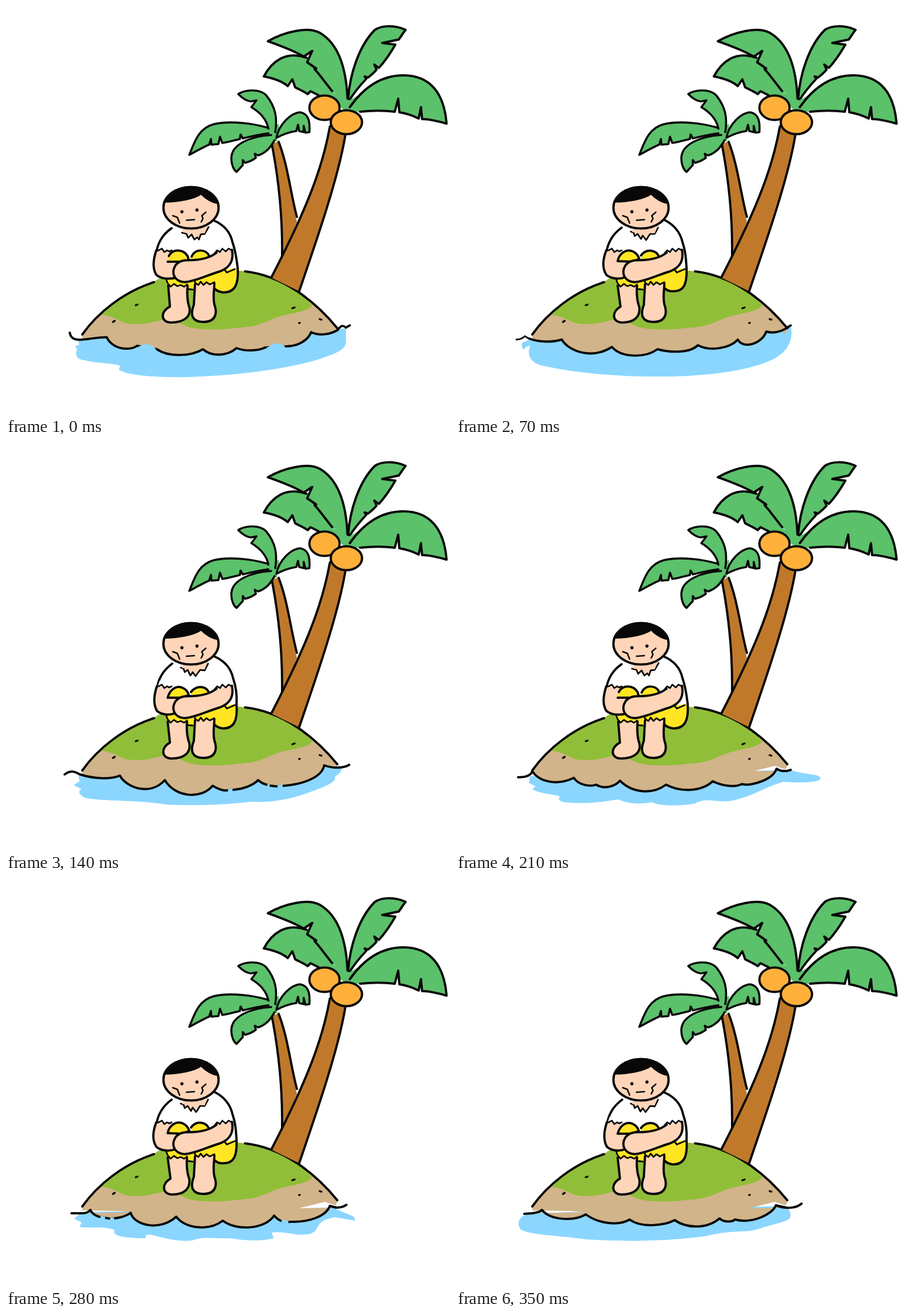
Animation, 780 px wide and 718 px high, one loop 0.42 s. Source, as an HTML page:

```html
<!DOCTYPE html>
<html lang="en">
<head>
<meta charset="utf-8">
<title>Castaway</title>
<style>
html, body { margin: 0; width: 100%; height: 100%; overflow: hidden; background: #fff; }
svg { display: block; width: 780px; height: 718px; }
path, ellipse { stroke-linecap: round; stroke-linejoin: round; }
.ink { fill: none; stroke: #080808; stroke-width: 4; }
.leaf { fill: #5bc16b; }
.bark { fill: #c0792b; }
.nut { fill: #ffb03b; }
.sand { fill: #d1b489; }
.grass { fill: #91be38; }
.skin { fill: #ffd5b9; }
.cloth { fill: #fff; }
.shorts { fill: #ffe522; }
.sea { fill: #8bd6ff; stroke: none; }
.foam { stroke: #8bd6ff; stroke-width: 5; stroke-linecap: butt; }
.bare { stroke: none; }
.thin { stroke-width: 2.8; }

/* six sea drawings, three drawings of the man */
.wave, .pose { visibility: hidden; animation: wave 420ms step-end infinite; animation-delay: calc(var(--i) * 70ms - 420ms); }
.pose { animation-name: pose; animation-duration: 210ms; }
@keyframes wave { 0% { visibility: visible } 16.66%, 100% { visibility: hidden } }
@keyframes pose { 0% { visibility: visible } 33.33%, 100% { visibility: hidden } }
</style>
</head>
<body>
<svg viewBox="0 0 780 718">
<defs>
  <path id="beach" class="sand bare" d="M134 579C160 541 200 505 260 486C300 464 375 462 420 467C490 476 550 525 583 568L579 576L560 570L495 586L300 594L200 586L134 585Z"/>
</defs>

<g class="ink">
  <g class="wave" style="--i:0">
    <path class="sea" d="M125 586L129 596L121 599Q127 604 123 609C123 619 128 622 136 623C160 629 185 628 201 633L198 640C215 651 270 654 320 653C420 650 510 636 560 618C590 608 599 600 597 588L597 568Z"/>
    <use href="#beach"/>
    <path class="sand" d="M135 587C150 586 165 582 177 583C183 596 198 604 214 603C221 603 226 601 230 598L265 604C285 618 325 617 346 604C360 617 388 617 405 602C420 608 443 607 455 601L492 599C513 599 531 588 536 574C550 581 570 578 583 570"/>
    <path class="sea" d="M231 602Q240 593 252 596Q262 600 265 608ZM457 604Q468 591 480 594Q490 596 491 602Z"/>
    <path class="foam" d="M233 601L263 606M458 603L489 601"/>
    <path d="M112 575C114 587 124 588 135 587M583 570C590 559 595 564 597 566L604 562"/>
  </g>
  <g class="wave" style="--i:1">
    <path class="sea" d="M133 586L117 592Q113 598 119 605Q122 598 131 598C123 612 130 628 152 633C220 648 300 653 370 652C460 651 530 637 560 620C585 606 593 585 588 562Z"/>
    <use href="#beach"/>
    <path class="sand" d="M128 585C145 592 170 592 186 587C197 607 238 623 274 600C290 619 332 620 354 604C380 611 412 610 425 597C445 608 481 603 495 587C505 605 538 594 545 573C560 577 575 572 588 562"/>
    <path class="thin" d="M106 587Q115 587 121 581L129 586"/>
  </g>
  <g class="wave" style="--i:2">
    <path class="sea" d="M127 586L129 597L119 604L133 611Q122 616 138 626C170 633 225 629 282 638C340 641 400 637 430 633C480 636 520 622 545 612C570 603 580 596 578 589C592 580 590 574 591 570Z"/>
    <use href="#beach"/>
    <path class="sand" d="M130 585C155 593 185 594 200 587C211 608 253 624 279 595C297 625 342 630 363 605C375 612 382 614 388 613L400 612C415 611 433 605 443 595C450 602 462 605 475 606L488 605C523 602 555 590 559 569"/>
    <path class="foam" d="M390 613L398 612.500M459 604L463 605M477 606L486 605.500"/>
    <path d="M103 585C115 576 122 581 130 585M559 569C575 575 594 574 603 568"/>
  </g>
  <g class="wave" style="--i:3">
    <path class="sea" d="M130 588L128 600L140 606L134 611C150 620 165 618 183 624C175 632 190 635 205 635C240 637 265 632 285 629C305 638 325 637 345 634C360 642 400 640 420 636C440 625 455 634 480 632C520 625 545 606 575 598C600 600 640 600 640 592C640 583 615 587 588 577Z"/>
    <use href="#beach"/>
    <path class="sand" d="M134 579C145 597 176 606 207 591C215 604 236 607 246 603C260 612 280 606 288 596C310 618 345 621 369 603C395 617 432 615 451 597C465 604 488 609 502 602C508 603 512 604 520 602C545 597 560 586 563 575C570 580 576 579 581 579"/>
    <path d="M109 590C122 590 132 587 134 579M581 579L588 577"/>
  </g>
  <g class="wave" style="--i:4">
    <path class="sea" d="M132 588L120 600L133 606L129 614C150 617 175 612 191 620C186 630 205 633 245 634L246 628C260 627 268 632 276 633C300 639 320 640 330 637C345 630 370 635 395 634C430 640 455 638 470 634L467 624C490 620 510 632 535 626C554 619 540 603 578 597L613 603L612 597C600 590 590 588 575 580Z"/>
    <use href="#beach"/>
    <path class="sand" d="M134 590C142 590 146 587 148 584C152 592 158 594 163 596L180 599C195 600 210 596 219 589C225 612 271 622 299 596C315 617 356 622 381 603C405 622 456 618 471 594C480 605 490 606 500 605C531 606 562 596 569 577L580 580"/>
    <path class="foam" d="M166 597L174 598.500M183 600L190 600M484 604L496 606"/>
    <path d="M115 590L134 590M569 577C579 582 592 580 598 575"/>
  </g>
  <g class="wave" style="--i:5">
    <path class="sea" d="M132 590C108 595 107 607 113 618C125 628 180 629 230 636C320 642 400 636 440 630C490 618 510 625 530 618C560 608 585 605 587 597C590 589 585 583 578 577Z"/>
    <use href="#beach"/>
    <path class="sand" d="M134 590C143 589 148 587 151 584C165 602 206 605 228 592C250 608 285 613 305 601C325 616 366 612 384 602C405 617 441 618 463 599C470 606 485 606 490 601C520 609 556 592 562 576L580 580"/>
    <path d="M120 591L134 590M562 576C580 584 600 580 607 573"/>
  </g>

  <path class="grass bare" d="M167 543C195 512 225 498 262 484C290 464 360 460 420 467C476 474 515 502 538 526C534 538 500 540 475 548C450 558 440 565 410 566C370 571 335 570 318 564C300 556 288 549 272 553C245 561 220 562 204 556C190 548 180 545 167 543Z"/>
  <path d="M134 578C160 541 206 503 260 486M420 467C490 475 546 523 582 567"/>
  <path d="M228 526.500L231 525.500M188 556L191 554M503 532L507 530.500M515 558L516 557.500M551 551L554 552" stroke-width="3.400"/>

  <!-- small palm -->
  <path class="bark bare" d="M467 243C480 310 486 370 485 444L511 380C500 330 496 280 479 238Z"/>
  <path d="M467 243C480 310 486 370 485 440M479 239C495 280 500 330 511 371"/>
  <g stroke-width="3.600">
    <path class="leaf bare" d="M452 212L480 208L476 238L456 236Z"/>
    <path class="leaf" d="M459 214C435 207 395 201 365 208C338 215 331 240 322 262C335 255 347 248 357 244L360 234L361 244L373 243L376 230L380 241C393 239 402 236 411 234L412 226L416 233C432 229 446 226 461 224"/>
    <path class="leaf" d="M461 216C458 200 446 187 431 178L440 166L430 168C421 167 414 161 408 155C420 147 445 145 457 157C474 178 477 198 473 222"/>
    <path class="leaf" d="M475 232C479 209 500 188 517 187C533 190 534 206 533 222L526 223L523 211L523 222L515 220L513 209L510 220C497 222 488 225 475 232"/>
    <path class="leaf" d="M466 227C430 229 398 243 396 265C395 279 400 288 405 292L416 280L416 271L420 276C428 274 434 271 439 267L437 260L443 263C458 258 465 248 472 236"/>
  </g>

  <!-- big palm -->
  <path class="bark bare" d="M569 208C557 280 532 350 466 478L515 502C550 400 584 300 596 222Z"/>
  <path d="M569 212C557 280 532 350 466 478M596 228C584 300 550 400 515 502"/>
  <path class="leaf bare" d="M528 92C490 78 466 99 453 124C475 128 487 134 495 141L503 128L507 145C515 147 523 150 530 155L536 150L548 157L575 165L575 140Z"/>
  <path d="M528 91C490 78 466 99 453 124C475 128 487 134 495 141L503 129L508 143C515 147 523 150 530 155L535 150L549 157"/>
  <path class="leaf bare" d="M460 62C490 45 530 36 551 47C584 66 598 110 600 170L573 150L545 113L527 101L538 79L524 89Z"/>
  <path d="M573 150L549 119L542 111L545 110L529 99L538 79L523 89C505 78 482 70 460 62C490 45 530 36 551 47C584 66 598 110 600 165"/>
  <path class="leaf" d="M601 164C604 120 620 70 648 42C660 34 682 33 702 42C697 48 694 54 690 59L661 65L684 68C676 82 665 98 655 109L647 103L651 112C646 118 641 122 636 126L630 124L633 128C620 142 610 155 603 166"/>
  <path class="leaf bare" d="M600 165L570 150L580 172L598 186L622 186L632 150L603 166Z"/>
  <path class="leaf" d="M604 178C632 138 665 122 698 122C747 122 770 156 774 207C760 203 745 199 731 199L729 178L725 198C715 193 704 189 691 187L689 163L683 186C660 183 640 184 622 186"/>
  <ellipse class="nut" cx="559.500" cy="179" rx="26.500" ry="21.500"/>
  <ellipse class="nut" cx="598" cy="204.500" rx="27.500" ry="21"/>

  <!-- man: seat, back and legs -->
  <path class="shorts bare" d="M280 478L283 491L325 500L335 499L366 492L366 476Z"/>
  <path class="cloth bare" d="M292 389L264 436L285 470L382 468L405 461L398 416L364 377Z"/>
  <g class="pose" style="--i:0">
    <path class="shorts bare" d="M407 461C409 488 403 505 381 504C373 503 369 501 364 498L364 472L384 464Z"/>
    <path class="cloth" d="M291 391C276 401 266 417 264 436M364 377C381 384 394 397 398 416C403 430 405 444 407 461"/>
    <path d="M407 461C409 488 403 505 381 504C375 503 370 501 367 498"/>
    <path class="skin" d="M285 492L288 529C270 538 272 557 290 557C313 557 326 546 322 530C318 519 318 505 319 492"/>
  </g>
  <g class="pose" style="--i:1">
    <path class="shorts bare" d="M405 461C406 487 402 503 380 502C373 502 369 500 364 497L364 472L384 464Z"/>
    <path class="cloth" d="M291 390C276 401 266 417 264 436M367 377C381 384 394 397 398 416C403 430 404 444 405 461"/>
    <path d="M405 461C406 487 402 503 380 502C375 502 370 500 367 497"/>
    <path class="skin" d="M284 492L289 529C272 539 275 557 292 557C314 557 324 546 322 530C318 519 317 505 318 492"/>
  </g>
  <g class="pose" style="--i:2">
    <path class="shorts bare" d="M405 461C407 488 402 505 380 504C373 503 369 501 364 498L364 472L384 464Z"/>
    <path class="cloth" d="M292 390C277 401 267 417 265 436M365 377C382 384 395 397 399 416C404 430 406 444 405 461"/>
    <path d="M405 461C407 488 402 505 380 504C375 503 370 501 367 498"/>
    <path class="skin" d="M284 492L288 529C271 538 273 557 291 557C314 557 325 546 322 530C318 519 317 505 318 492"/>
  </g>
  <path class="skin" d="M332 490L330 526C323 544 327 556 347 556C368 556 372 541 366 525C363 512 366 500 366 488"/>
  <path class="shorts bare" d="M280 476L284 489L289 494L295 489L301 493L307 491L313 494L319 490L319 476ZM331 476L332 486L338 490L342 485L347 491L352 486L358 490L366 486L366 474Z"/>
  <path class="thin" d="M281 480L284 488L289 494L295 489L301 493L307 491L313 494L318 490M331 480L332 487L338 491L342 485L347 491L352 486L358 490L366 486M318 498L328 499M383 463L388 469L402 463"/>

  <!-- arms and knees -->
  <path class="skin bare" d="M264 430C258 448 257 462 264 473C273 482 288 481 299 478L312 448L284 450L289 432Z"/>
  <g class="pose" style="--i:0">
    <path class="shorts" d="M286 440C292 427 311 427 319 440L322 450L284 450M326 441C333 426 352 428 357 440L345 452L322 450"/>
    <path d="M264 430C258 448 257 462 264 473C273 481 288 481 299 478"/>
  </g>
  <g class="pose" style="--i:1">
    <path class="shorts" d="M284 449C287 434 300 427 311 432Q319 436 322 445L310 450ZM325 439C335 426 352 429 357 442L345 450L325 448"/>
    <path d="M264 430C257 448 257 462 264 473C273 481 288 481 298 477"/>
  </g>
  <g class="pose" style="--i:2">
    <path class="shorts" d="M284 450C288 435 300 427 311 433Q319 437 321 445L310 450ZM325 440C335 427 352 429 357 442L345 450L325 448"/>
    <path d="M265 430C259 448 259 462 265 473C274 481 288 481 298 477"/>
  </g>
  <path class="skin" d="M397 429C400 446 396 459 376 467C357 472 333 485 314 486C296 485 289 470 298 456C307 445 319 448 330 447C347 446 360 442 370 434"/>
  <path class="cloth bare" d="M267 429L275 427L279 433L284 430L291 432L292 420L270 420ZM365 437L371 430L376 433L380 427L386 432L391 427L395 429L394 412L360 420Z"/>
  <path class="thin" d="M264 431L268 430L274 427L278 433L283 430L287 432L291 430M365 437L371 430L376 433L380 427L386 432L391 427L397 430"/>

  <!-- neck -->
  <g class="thin">
    <path class="skin pose" style="--i:0" d="M309 399L317 401L320 408L326 402L331 411L336 407L339 411L342 402L349 401L356 389"/>
    <path class="skin pose" style="--i:1" d="M307 397L312 399L314 405L319 401L325 410L328 404L334 412L341 401L349 401L355 390"/>
    <path class="skin pose" style="--i:2" d="M307 397L312 399L314 405L319 401L324 411L328 405L333 412L341 401L349 402L355 390"/>
  </g>
  <path class="skin bare" d="M310 386L310 398L349 400L355 386Z"/>

  <!-- head -->
  <ellipse class="skin" cx="325" cy="355" rx="48.500" ry="36.500"/>
  <path d="M280 345C283 328 303 318 327 318C351 319 369 331 370 347C361 346 349 338 343 331C330 340 303 345 280 345Z" fill="#080808" stroke-width="2"/>
  <path d="M309 362L309 362.100M335.500 359L335.500 359.100" stroke-width="5.600"/>
  <path d="M317 377L331 376M293 369L301 372L305 382M351 363L344 369L346 374L343 380" stroke-width="2.600"/>
</g>
</svg>
</body>
</html>
```
